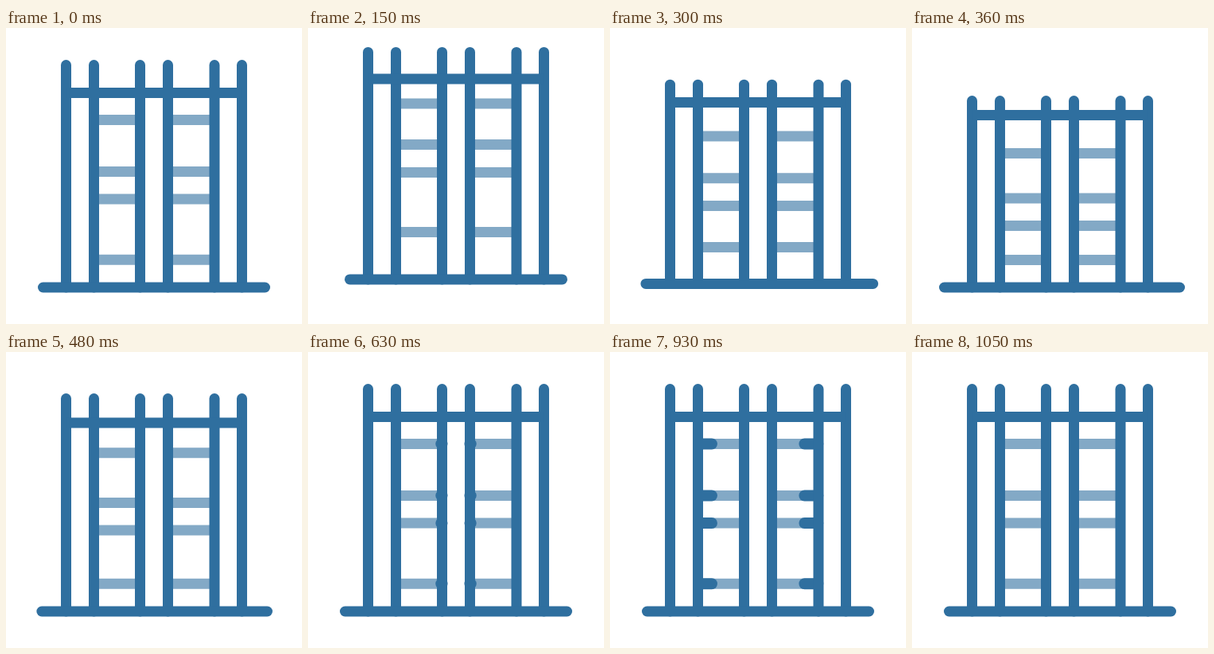
Animation of 372x372 px, one loop 1110 ms. Source, as an HTML page with a canvas:

```html
<!DOCTYPE html>
<html lang="en">
<head>
<meta charset="utf-8">
<title>Bouncing ladders</title>
<style>
  html, body { margin: 0; width: 100%; height: 100%; overflow: hidden; background: #fff; }
  canvas { display: block; width: 372px; height: 372px; }
</style>
</head>
<body>
<canvas id="stage" width="372" height="372"></canvas>
<script>
const ctx = document.getElementById('stage').getContext('2d');
const LOOP = 1110, STEP = 30;
const DARK = '#2f6f9f', LIGHT = '#83a9c6';
const POSTS = [75.5, 110.5, 168.5, 203.5, 262, 296.5];

// Each pose: base left, base right, base y, post top, bar y, four rung heights
const REST   = [40, 332, 326, 40, 81.5, 115.5, 180.5, 215, 291.2];
const JUMP   = [49.5, 322.5, 310, 14.5, 53.7, 83, 126.5, 161.8, 236.2];
const SQUASH = [34, 343, 326, 85, 109.5, 157.5, 214, 248.5, 291.5];

const span = (t, a, b) => Math.min(1, Math.max(0, (t - a) / (b - a)));
const smooth = u => u * u * (3 - 2 * u);
const mix = (a, b, k) => a + (b - a) * k;
const blend = (p, q, k) => p.map((v, i) => mix(v, q[i], k));

function poseAt(t) {
  if (t < 209) return blend(REST, JUMP, smooth(span(t, 66, 209)));
  if (t < 360) return blend(JUMP, SQUASH, smooth(span(t, 209, 350)));
  return blend(SQUASH, REST, smooth(Math.pow(span(t, 360, 600), 0.6)));
}

function line(x1, y1, x2, y2, color, width, cap) {
  ctx.strokeStyle = color;
  ctx.lineWidth = width;
  ctx.lineCap = cap;
  ctx.beginPath();
  ctx.moveTo(x1, y1);
  ctx.lineTo(x2, y2);
  ctx.stroke();
}

function draw(t) {
  const [left, right, base, top, bar, ...rungs] = poseAt(t);
  const head = smooth(span(t, 600, 953));
  const tail = smooth(span(t, 720, 1050));

  ctx.fillStyle = '#fff';
  ctx.fillRect(0, 0, 372, 372);

  for (const [inner, outer] of [[168.5, 110.5], [203.5, 262]]) {
    for (const y of rungs) {
      line(inner, y, outer, y, LIGHT, 13, 'butt');
      if (head > 0 && tail < 1) {
        line(mix(inner, outer, tail), y, mix(inner, outer, head), y, DARK, 14, 'round');
      }
    }
  }
  for (const x of POSTS) line(x, top + 6.5, x, base, DARK, 13, 'round');
  line(POSTS[0], bar, POSTS[5], bar, DARK, 13, 'butt');
  line(left + 6.5, base, right - 6.5, base, DARK, 13, 'round');
}

const start = performance.now();
function tick() {
  const t = (performance.now() - start) % LOOP;
  draw(Math.floor(t / STEP) * STEP);
  requestAnimationFrame(tick);
}
tick();
</script>
</body>
</html>
```
